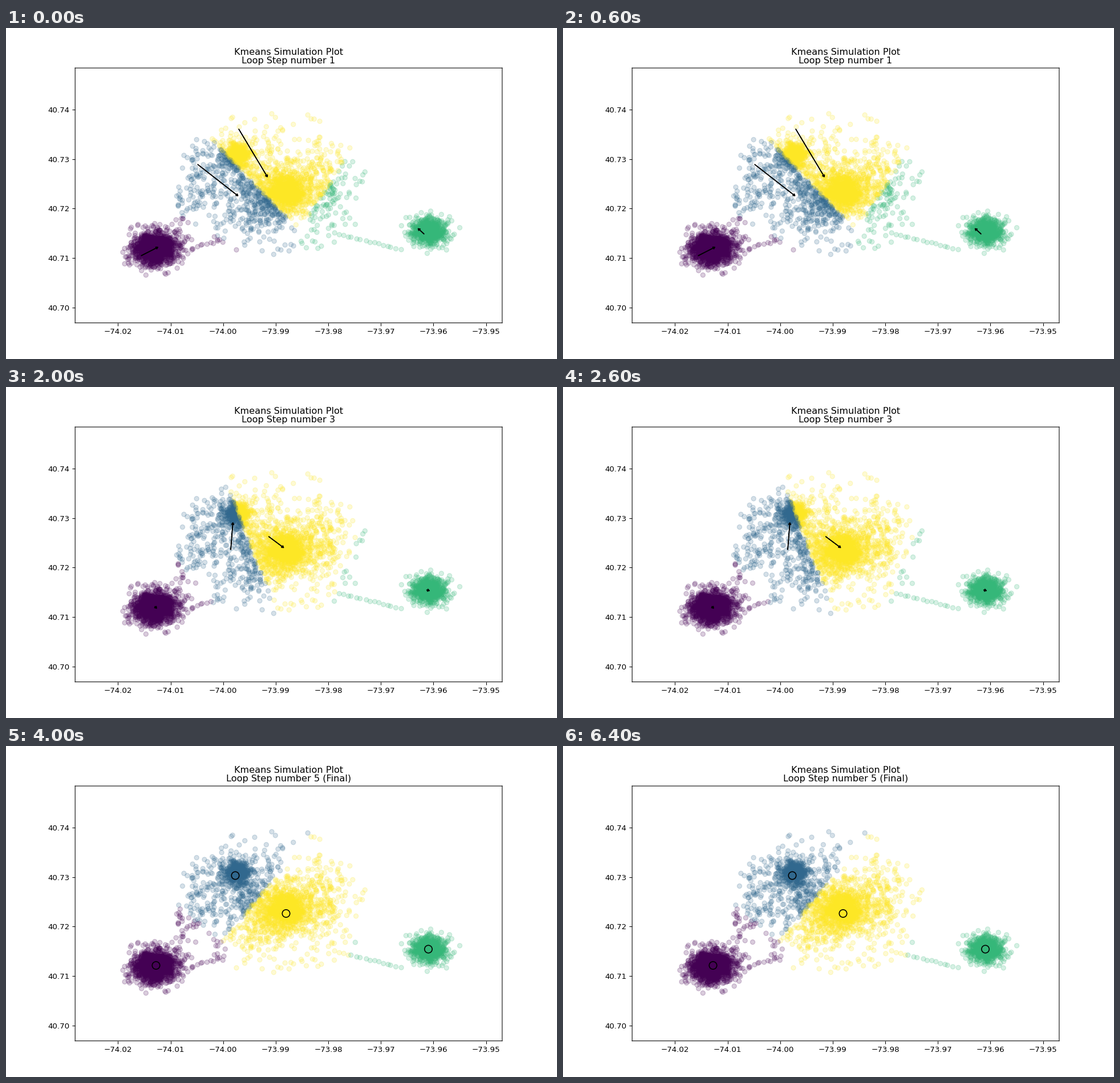
These frames come from a looping animation (966x580 px, 8000 ms). A matplotlib script:

```python
import numpy as np
import matplotlib.pyplot as plt
from matplotlib.animation import FuncAnimation

plt.rcParams["font.family"] = "DejaVu Sans"
W, H, DPI = 966, 580, 96.6
rng = np.random.default_rng(11)


def geo(xy):
    """Stage pixels to longitude and latitude."""
    x, y = np.asarray(xy, float).T
    return np.column_stack([-74.02 + (x - 196.5) / 9215, 40.74 - (y - 143) / 8670])


def cloud(center, sx, sy, n, cut=3.8, tilt=0):
    """Normal cloud with a slightly heavy tail, cut off at an ellipse."""
    r = rng.rayleigh(size=n) * rng.lognormal(0, 0.25, n)
    r = r[r < cut]
    a = rng.uniform(0, 2 * np.pi, r.size)
    u, v = sx * r * np.cos(a), sy * r * np.sin(a)
    c, s = np.cos(np.radians(tilt)), np.sin(np.radians(tilt))
    return np.column_stack([c * u - s * v, s * u + c * v]) + center


def trail(start, end, n, jitter):
    return np.linspace(start, end, n) + rng.normal(0, jitter, (n, 2))


points = geo(np.vstack([
    # dense hubs
    cloud((262, 386), 18, 13, 1700),
    cloud((742, 356), 14.5, 11, 780),
    cloud((491, 287), 18, 15, 900),
    cloud((406, 221), 11, 9, 420),
    # looser surroundings
    cloud((492, 280), 40, 28, 250, 2.3),
    cloud((408, 222), 26, 22, 150, 2.3),
    cloud((435, 282), 40, 14, 130, 1.8, tilt=47),
    cloud((465, 275), 75, 58, 500, 2.3),
    cloud((552, 272), 30, 45, 170, 1.9),
    cloud((345, 255), 28, 42, 110, 1.6),
    cloud((430, 328), 32, 30, 110, 1.9),
    # streets
    trail((304, 285), (309, 340), 18, 4),
    trail((322, 318), (380, 255), 20, 2),
    trail((325, 387), (382, 370), 11, 1.5),
    trail((577, 360), (692, 388), 16, 1),
]))
rng.shuffle(points)

# Path of each cluster centre, one stop per step
purple = [(237, 399), (263.3, 385.6), (261, 384.5), (261.8, 385.4), (263, 384.5)]
blue = [(336, 239), (404, 292), (394, 285), (397.5, 241), (402, 227)]
green = [(733, 361), (725, 353.7), (737.5, 355.6), (739, 356), (740.5, 356)]
yellow = [(408, 177), (456.5, 258), (460.5, 262), (484, 279.5), (491, 293.5)]
centres = [geo(stop) for stop in zip(purple, blue, green, yellow)]
last = len(centres) - 1


def nearest(c):
    return np.argmin(((points[:, None] - c) ** 2).sum(axis=2), axis=1)


fig = plt.figure(figsize=(W / DPI, (H + 0.01) / DPI), dpi=DPI)
left, right, top, bottom = 121.2, 869.9, 70.1, 516.7
ax = fig.add_axes((left / W, 1 - bottom / H, (right - left) / W, (bottom - top) / H))
(x0, y0), (x1, y1) = geo([(left, bottom), (right, top)])
ax.set(xlim=(x0, x1), ylim=(y0, y1))
for spine in ax.spines.values():
    spine.set_snap(False)
for axis in (ax.xaxis, ax.yaxis):
    axis.set_major_formatter(lambda v, _: f"{v:.2f}".replace("-", "\u2212"))

dots = ax.scatter(*points.T, c=nearest(centres[0]), vmin=0, vmax=last - 1,
                  cmap="viridis", alpha=0.2)
marks = [
    [
        ax.arrow(*a, *(b - a), width=5e-5, head_width=5e-4, head_length=4e-4,
                 fc="k", ec="k")
        for a, b in zip(old, new)
    ]
    for old, new in zip(centres, centres[1:])
]
marks.append([ax.scatter(*centres[-1].T, s=100, facecolors="none",
                         edgecolors="k", linewidths=1.2)])


def update(tick):
    step = min(tick, last)
    dots.set_array(nearest(centres[step]))
    for i, group in enumerate(marks):
        for mark in group:
            mark.set_visible(i == step)
    final = " (Final)" if step == last else ""
    ax.set_title(f"Kmeans Simulation Plot\nLoop Step number {step + 1}{final}",
                 linespacing=1.04)


anim = FuncAnimation(fig, update, frames=8, init_func=lambda: update(0),
                     interval=1000, repeat=True, repeat_delay=0)
plt.show()
```
